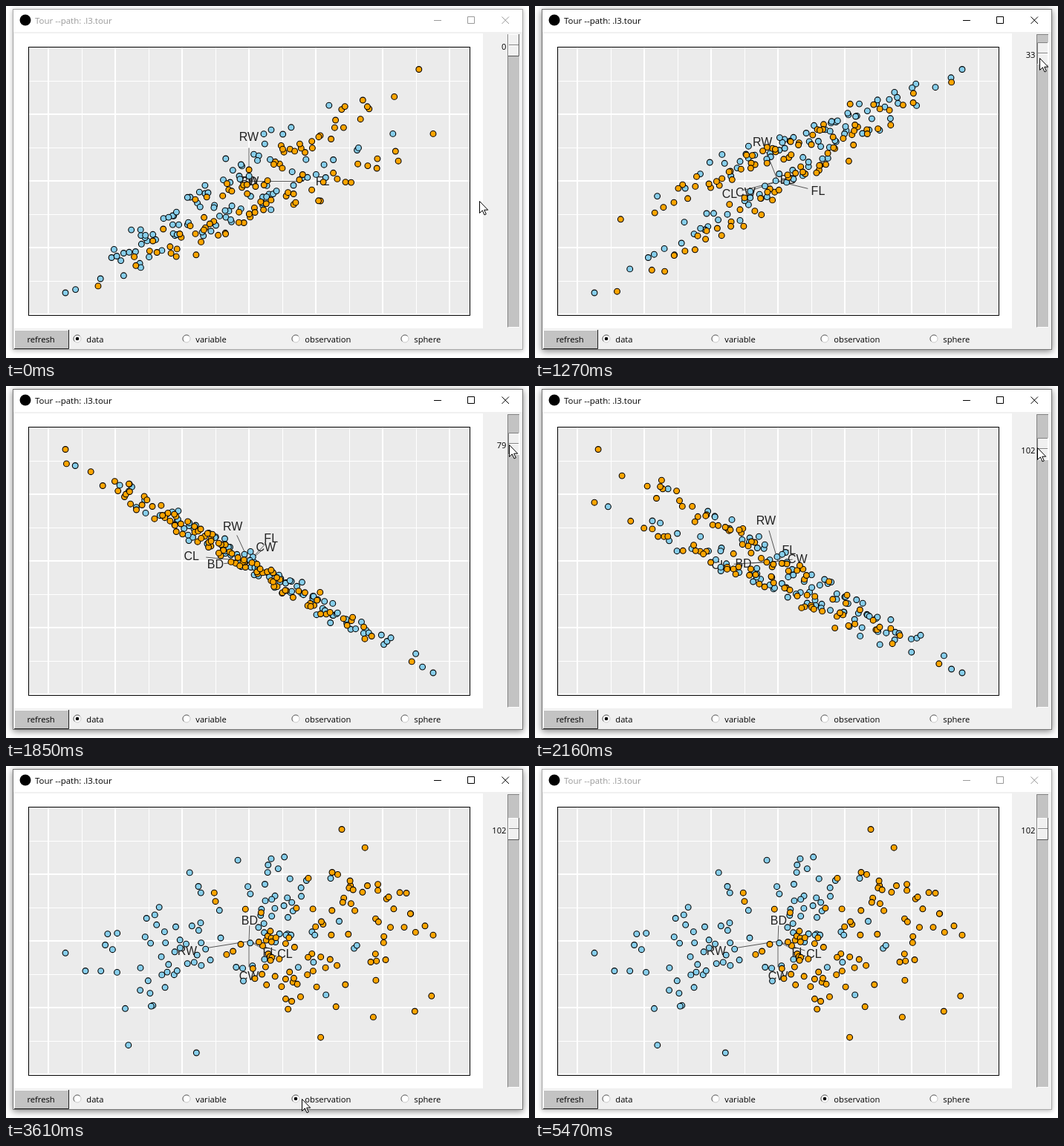
An HTML page that plays this animation: 704 by 475 pixels, repeating every 5570 ms.

```html
<!DOCTYPE html>
<html lang="en">
<head>
<meta charset="utf-8">
<title>Tour</title>
<style>
  html, body { margin: 0; width: 100%; height: 100%; overflow: hidden; background: #fff; }
  svg { display: block; width: 704px; height: 475px; font: 11.2px "Open Sans", "Noto Sans", sans-serif; }
  .axis text { font: 16px "Liberation Sans", Arial, sans-serif; text-anchor: middle; fill: #222; }
  .axis line { stroke: #555; }
  .points circle { stroke: #000; stroke-width: 1.1; }
  .line { fill: none; }
  #frame { fill: #f0f0f0; stroke: #aaa; filter: drop-shadow(0 1px 3px rgba(0,0,0,.3)); }
  #title { fill: #999; }
  #buttons { stroke: #999; fill: none; }
  .active #frame { stroke: #777; filter: drop-shadow(0 2px 5px rgba(0,0,0,.5)); }
  .active #title { fill: #000; }
  .active #buttons { stroke: #000; }
</style>
</head>
<body>
<svg id="stage" viewBox="0 0 704 475">
  <rect id="frame" x="9.5" y="4.5" width="686" height="459"/>
  <rect x="10" y="5" width="685" height="30" fill="#fff"/>
  <circle cx="26" cy="19" r="7.5"/>
  <text id="title" x="39" y="23.5" font-size="11.5">Tour --path: .l3.tour</text>
  <path id="buttons" d="M576 19.5h10M621.5 14.5h9v9h-9zM667.5 14.5l9.5 9.5M677 14.5l-9.5 9.5"/>

  <rect x="11" y="37" width="631" height="398" fill="#fff"/>
  <rect x="31" y="56" width="593" height="361" fill="#ebebeb"/>
  <g id="grid" stroke="#fff"></g>
  <rect x="30.5" y="55.5" width="594" height="362" class="line" stroke="#000"/>
  <g id="axes" class="axis"></g>
  <g id="points" class="points"></g>

  <rect x="675" y="38" width="17" height="396" fill="#c3c3c3"/>
  <path class="line" stroke="#828282" d="M675.5 433V38.5H691"/>
  <path class="line" stroke="#fff" d="M676 433.5h15.5V38"/>
  <g id="thumb">
    <rect x="676" width="15" height="30" fill="#f0f0f0"/>
    <path id="lit" class="line" d="M676.5 29V.5H690"/>
    <path id="shade" class="line" d="M676 29.5h14.5V0"/>
    <path class="line" stroke="#828282" d="M677 14.5h13"/>
    <path class="line" stroke="#fff" d="M677 15.5h13"/>
    <text id="value" x="673.5" y="20.5" text-anchor="end"></text>
  </g>

  <rect x="11" y="437" width="74" height="26" fill="#c3c3c3"/>
  <path class="line" stroke="#fff" d="M11.5 462V437.5H84"/>
  <path class="line" stroke="#222" d="M11 462.5h73.5V437"/>
  <text x="47" y="454" text-anchor="middle">refresh</text>
  <g id="radios"></g>
  <path id="cursor" fill="#fff" stroke="#000" d="M.5.5V16.5l3.8-3.6 2.7 6 2.3-1-2.6-5.7h5z"/>
</svg>
<script>
const LOOP = 5570, TICK = 127;
const $ = id => document.getElementById(id);
function add(parent, tag, attrs, text = "") {
  const el = document.createElementNS("http://www.w3.org/2000/svg", tag);
  set(el, attrs);
  el.textContent = text;
  parent.append(el);
  return el;
}
function set(el, attrs) {
  for (const key in attrs) el.setAttribute(key, attrs[key]);
}
const mix = (a, b, f) => a + (b - a) * f;

// Direction of each variable on screen: x row, y row
const NAMES = ["FL", "RW", "CL", "CW", "BD"];
const POSES = [
  [[1, 0, 0, 0, 0], [0, 1, 0, 0, 0]],
  [[.545, -.21, -.657, -.44, .14], [-.22, .88, -.28, -.25, .03]],
  [[.3, -.22, -.78, .23, -.455], [.52, .78, .12, .32, -.07]],
  [[.09, -.14, -.81, .28, -.475], [.15, .98, -.165, -.05, -.05]],
  [[.28, -.84, .49, 0, .01], [-.25, -.22, -.28, -.78, .47]]
];
// tick, pose, slider value
const TOUR = [[7, 0, 0], [10, 1, 33], [12, 2, 79], [14, 2, 79], [17, 2.72, 102], [19, 3, 102]];
// tick, x, y
const MOUSE = [
  [0, 637, 263], [1, 609, 127], [5, 671, 51], [7, 681, 51], [10, 679, 70], [12, 677, 77],
  [17, 676, 83], [18, 668, 100], [19, 488, 300], [21, 418, 455], [24, 400, 449],
  [29, 397, 449], [31, 419, 453], [32, 508, 458], [33, 720, 490]
];

// Values at a tick, linear between keys and held outside them
function track(keys, tick) {
  const next = keys.find(key => key[0] > tick) || keys.at(-1);
  const prev = keys.findLast(key => key[0] <= tick) || next;
  const f = (tick - prev[0]) / (next[0] - prev[0] || 1);
  return prev === next ? prev.slice(1) : prev.slice(1).map((v, i) => mix(v, next[i + 1], f));
}

let seed = 12;
function random() {
  seed = (seed * 1664525 + 1013904223) % 4294967296;
  return (seed + 1) / 4294967297;
}
const gauss = () => Math.sqrt(-2 * Math.log(random())) * Math.cos(2 * Math.PI * random());

// All measures grow linearly with the shell length, with small shifts by species and sex
function animal(orange, female, k) {
  const u = k / 49;
  const q = .5 + (u ** .4 - (1 - u) ** .4) / 2;
  const low = 16 + (female ? 5 * orange - 1 : orange * .7);
  const size = mix(low, female ? 41 + 5 * orange : 47.3, q);
  const noise = k % 49 ? .35 : 0;
  return [
    (.43 * size + 1) * (1 + .08 * orange),
    female ? .42 * size + .35 : .29 * size + 2.2,
    size,
    (1.15 * size + .3) * (1 - .03 * orange),
    (.42 * size + .2) * (1 + .07 * orange)
  ].map(v => v + noise * gauss());
}
const data = Array.from({ length: 200 }, (_, i) =>
  animal(+(i >= 100), Math.floor(i / 50) % 2, i % 50));
const byRow = data.map(row => {
  const low = Math.min(...row), span = Math.max(...row) - low;
  return row.map(v => (v - low) / span);
});

for (let i = 0; i < 7; i++) {
  const x = 57 + 90 * i;
  add($("grid"), "path", { d: `M${x} 56V417`, "stroke-width": 2 });
  if (i < 6) add($("grid"), "path", { d: `M${x + 45.5} 56V417` });
}
for (let i = 0; i < 4; i++) {
  const y = 146 + 90 * i;
  add($("grid"), "path", { d: `M31 ${y - 44.5}H624` });
  add($("grid"), "path", { d: `M31 ${y}H624`, "stroke-width": 2 });
}
const axes = NAMES.map(name => ({
  line: add($("axes"), "line", { x1: 327, y1: 236.5 }),
  label: add($("axes"), "text", {}, name)
}));
const dots = data.map((_, i) =>
  add($("points"), "circle", { r: 3.9, fill: i < 100 ? "#87ceeb" : "#ffa500" }));
const marks = ["data", "variable", "observation", "sphere"].map((name, i) => {
  const x = 96 + 147 * i;
  add($("radios"), "circle", { cx: x, cy: 449, r: 5, fill: "#fff", stroke: "#ccc" });
  add($("radios"), "path", { d: `M${x - 3.6} 452.6a5 5 0 0 1 7.2 -7.2`, fill: "none", stroke: "#666" });
  add($("radios"), "text", { x: x + 12.3, y: 454 }, name);
  return add($("radios"), "circle", { cx: x, cy: 449, r: 2.3 });
});

function basis(pose) {
  const i = Math.floor(pose), next = POSES[Math.ceil(pose)];
  return POSES[i].map((row, d) => row.map((v, j) => mix(v, next[d][j], pose - i)));
}

// Project the rows on an axis and fit them between two screen positions
function spread(rows, axis, from, to) {
  const v = rows.map(row => row.reduce((sum, a, j) => sum + a * axis[j], 0));
  const low = Math.min(...v), span = Math.max(...v) - low;
  return v.map(a => mix(from, to, (a - low) / span));
}

function drawPlot(rows, pose) {
  const [bx, by] = basis(pose);
  const xs = spread(rows, bx, 80, 575), ys = spread(rows, by, 387, 85.5);
  dots.forEach((dot, i) => set(dot, { cx: xs[i].toFixed(1), cy: ys[i].toFixed(1) }));
  axes.forEach(({ line, label }, j) => {
    set(line, { x2: 327 + 74 * bx[j], y2: 236.5 - 45 * by[j] });
    set(label, { x: 327 + 99 * bx[j], y: 242 - 60 * by[j] });
  });
}

function drawSlider(value, pressed) {
  set($("thumb"), { transform: `translate(0 ${Math.round(38.3 + value * .31)})` });
  set($("lit"), { stroke: pressed ? "#828282" : "#fff" });
  set($("shade"), { stroke: pressed ? "#fff" : "#555" });
  $("value").textContent = Math.round(value);
}

let shown = "";
function frame(now) {
  const t = now % LOOP, tick = Math.floor(t / TICK);
  const active = t >= 1030 && t < 5470, scaled = t >= 3610;
  const key = [tick, active, scaled].join();
  if (key !== shown) {
    shown = key;
    const [pose, value] = track(TOUR, tick), [x, y] = track(MOUSE, tick);
    $("stage").classList.toggle("active", active);
    drawPlot(scaled ? byRow : data, scaled ? 4 : pose);
    drawSlider(value, tick >= 8 && tick < 18);
    marks.forEach((mark, i) => set(mark, { opacity: +(i === (scaled ? 2 : 0)) }));
    set($("cursor"), { transform: `translate(${Math.round(x)} ${Math.round(y)})` });
  }
  requestAnimationFrame(frame);
}
frame(0);
</script>
</body>
</html>
```
